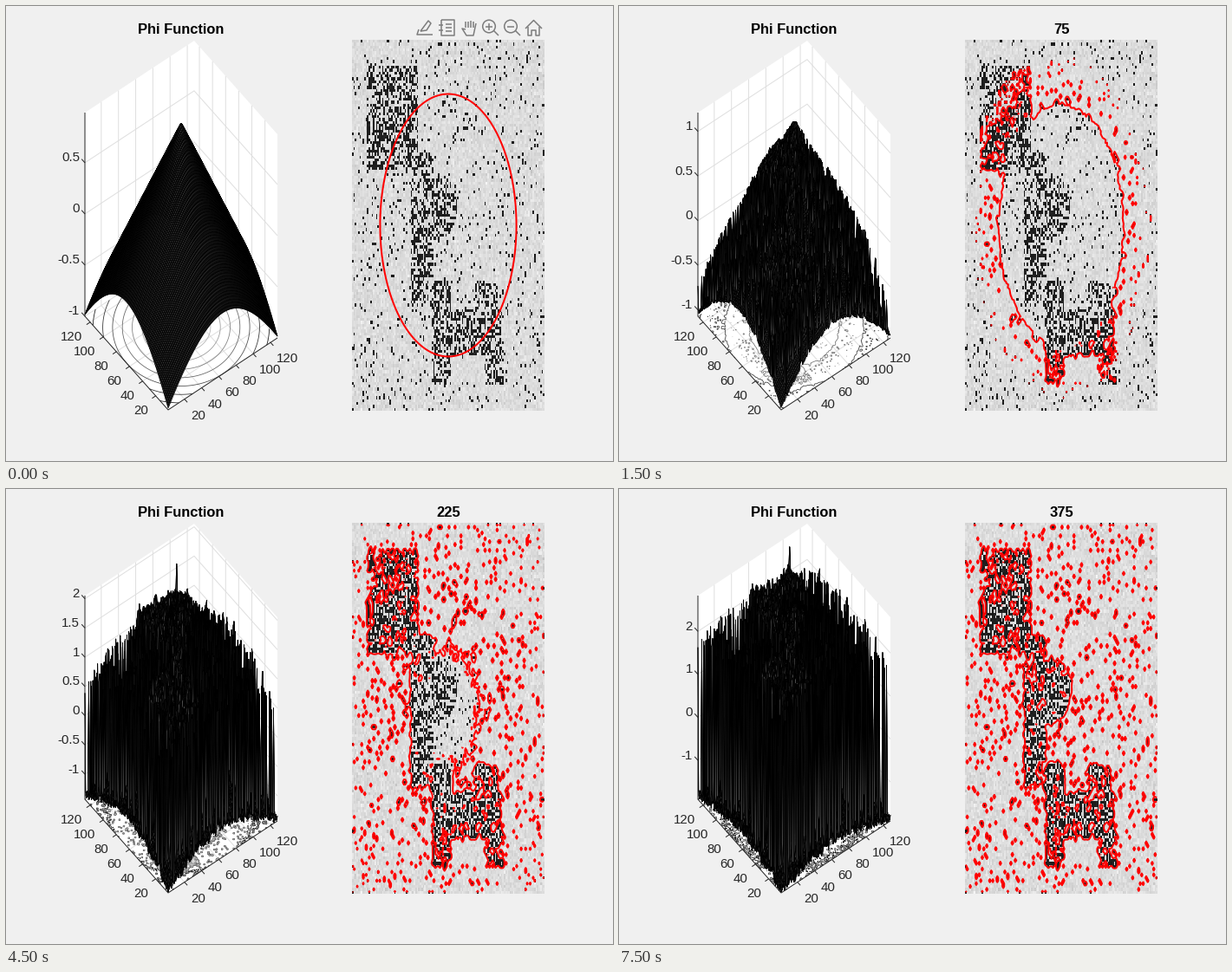
A matplotlib script for the animation above (8000 ms loop, 700x525 px).

```python
import numpy as np
import matplotlib.pyplot as plt
from matplotlib.animation import FuncAnimation
from matplotlib.collections import LineCollection, PolyCollection
from matplotlib.patches import Circle, Polygon

W, H, DPI = 700, 525, 100
PX = 72 / DPI
N = 128
FRAMES, STEP = 16, 25
LEFT, RIGHT, TOP, BOTTOM = 399, 621, 39, 467
INK, GRID, ICON = "#262626", "#dfdfdf", "#7c7c7c"

plt.rcParams["font.family"] = "Liberation Sans"
plt.rcParams["contour.negative_linestyle"] = "solid"
fig = plt.figure(figsize=(W / DPI, H / DPI), dpi=DPI, facecolor="#f0f0f0")
ax = fig.add_axes([0, 0, 1, 1])
ax.axis("off")

# Noisy picture: a dense dark figure among sparse dark specks
rng = np.random.default_rng(7)
px = LEFT + (np.arange(N) + 0.5) * (RIGHT - LEFT) / N
py = TOP + (np.arange(N) + 0.5) * (BOTTOM - TOP) / N
X, Y = np.meshgrid(px, py)
head, spine, left_leg, right_leg, hips, foot = (
    (417, 68, 476, 188), (467, 168, 493, 346), (491, 318, 514, 438),
    (541, 316, 567, 400), (491, 350, 570, 405), (551, 385, 575, 436))
inside = np.hypot((X - 494) / 27, (Y - 232) / 38) < 1
for x0, y0, x1, y1 in (head, spine, left_leg, right_leg, hips, foot):
    inside |= (X > x0) & (X < x1) & (Y > y0) & (Y < y1)
dark = rng.random((N, N)) < np.where(inside, 0.48, 0.055)
gray = np.where(dark, rng.normal(0.12, 0.015, (N, N)),
                rng.normal(0.86, 0.03, (N, N))).clip(0, 0.97)

# Level set: a cone pushed up on dark cells and down on bright ones
col, row = np.meshgrid(np.arange(N), np.arange(N))
phi0 = 1 - np.hypot(col - 63.5, row - 63.5) / 45.3
near = sum(np.roll(dark, (i, j), (0, 1)) for i in (-1, 0, 1)
           for j in (-1, 0, 1) if i or j) / 8
grain = rng.random((N, N))
lift = np.where(dark, 0.8 + 0.3 * near + 0.1 * grain, 1.8 * near ** 2)
drop = np.where(dark, 0, 0.85 + 0.3 * grain)


def warp(p):
    return p + p ** 3 / 12


def unwarp(y):
    return 4 * np.sinh(np.arcsinh(0.75 * y) / 3)


def evolve(k):
    """Surface at step k with its lower and upper height limit."""
    t = k / (FRAMES - 1)
    up, down = 3.73 * t ** 1.45, 1.4 * t ** 1.7
    phi = unwarp(warp(phi0) + up * lift - down * drop)
    return phi, unwarp(warp(-1) - down), max(0.99, unwarp(warp(0.93) + up))


def proj(u, v, h=0.0):
    return 187 + 126 * u - 96 * v, 466 - 83 * u - 108 * v - 235 * h


def lines(segs, color, width=1, z=1):
    return ax.add_collection(LineCollection(
        segs, colors=color, linewidths=width * PX, zorder=z), autolim=False)


def label(x, y, s, ha, size=15, color=INK, **kw):
    return ax.text(x, y, s, ha=ha, va="center", fontsize=size * PX,
                   color=color, **kw)


def title(x, s):
    return label(x, 28, s, "center", 16.5, "black", weight="bold")


def toolbar():
    segs = [[(476, 27), (474, 33), (492, 33)],                       # export
            [(478, 29), (487, 17), (490, 20), (485, 28), (478, 29)],
            [(502, 16), (517, 16), (517, 34), (502, 34), (502, 16)]]  # page
    segs += [[(507, y), (514, y)] for y in (21, 25, 29)]
    segs += [[(499, y), (504, y)] for y in (22, 28)]
    segs += [[(530 + 3 * i, 25), (530 + 3 * i, 18 - i % 3 / 2)]       # hand
             for i in range(4)]
    segs.append([(530, 27), (526, 26), (531, 34), (539, 34), (542, 20)])
    items = []
    for x in (557, 582):                                             # zoom
        segs += [[(x + 5.5, 28.5), (x + 11, 34)], [(x - 4, 23.5), (x + 4, 23.5)]]
        items.append(ax.add_patch(Circle((x, 23.5), 7.3, fill=False, ec=ICON,
                                         lw=1.5 * PX, zorder=6)))
    segs += [[(557, 19.5), (557, 27.5)],
             [(599, 26), (608.5, 16.5), (618, 26)],                  # home
             [(602, 24), (602, 34), (606, 34), (606, 28), (611, 28),
              (611, 34), (615, 34), (615, 24)]]
    return items + [lines(segs, ICON, 1.5, 6)]


ax.imshow(gray, cmap="gray", vmin=0, vmax=1, interpolation="nearest",
          extent=(LEFT, RIGHT, BOTTOM, TOP), aspect="auto", zorder=1)
ax.set_xlim(0, W)
ax.set_ylim(H, 0)

# White floor and walls share one outline
ax.add_patch(Polygon([proj(0, 0), proj(1, 0), proj(1, 0, 1), proj(1, 1, 1),
                      proj(0, 1, 1), proj(0, 1)], fc="white", zorder=0))
grid, marks = [], []
for tick in range(20, 121, 20):
    f = (tick - 1) / (N - 1)
    grid += [[proj(f, 0), proj(f, 1), proj(f, 1, 1)],
             [proj(0, f), proj(1, f), proj(1, f, 1)]]
    x, y = proj(f, 0)
    marks.append([(x, y), (x + 3.3, y + 3.7)])
    label(x + 7, y + 19, str(tick), "left")
    x, y = proj(0, f)
    marks.append([(x, y), (x - 4.2, y + 2.8)])
    label(x - 9, y + 17, str(tick), "right")
lines(grid, GRID)
lines(marks + [[proj(0, 1, 1), proj(0, 1), proj(0, 0), proj(1, 0)]], INK, z=5)
title(202, "Phi Function")
count = title(510, "")
icons = toolbar()

U, V = col / (N - 1), row / (N - 1)
FX, FY = proj(U, V)
live = []


def draw(k):
    while live:
        live.pop().remove()
    phi, lo, hi = evolve(k)
    span = hi - lo
    count.set_text(str(STEP * k) if k else "")
    for icon in icons:
        icon.set_visible(k < 2)

    # Height scale
    step = 0.5 if span < 3.85 else 1
    rails, pins = [], []
    for n in range(int(np.ceil(lo / step - 1e-6)), int(hi // step) + 1):
        h = (n * step - lo) / span
        rails.append([proj(0, 1, h), proj(1, 1, h), proj(1, 0, h)])
        x, y = proj(0, 1, h)
        pins.append([(x, y), (x - 3.8, y - 4.2)])
        live.append(label(85, y - 5.5, f"{n * step:g}", "right"))
    live.extend([lines(rails, GRID), lines(pins, INK, z=5)])

    # Contours on the floor
    gap = 0.2 if span < 2.2 else 0.5
    levels = gap * np.arange(np.ceil(lo / gap + 0.01), hi / gap)
    live.append(ax.contour(FX, FY, phi, levels=levels, cmap="gray", vmin=lo,
                           vmax=hi, linewidths=0.8 * PX, zorder=2))

    # Mesh, painted from the far corner to the near one
    p = np.dstack(proj(U, V, (phi.clip(lo, hi) - lo) / span))
    quads = np.stack([p[:-1, :-1], p[:-1, 1:], p[1:, 1:], p[1:, :-1]], axis=2)
    live.append(ax.add_collection(PolyCollection(
        quads.reshape(-1, 4, 2)[::-1], facecolors="#555555",
        edgecolors="black", linewidths=0.75 * PX, zorder=3), autolim=False))

    # Zero level over the picture
    live.append(ax.contour(px, py, phi, levels=[0], colors="red",
                           linewidths=2 * PX, zorder=4))
    return []


anim = FuncAnimation(fig, draw, frames=FRAMES, interval=500, repeat=True,
                     repeat_delay=0, init_func=lambda: [], blit=False)
plt.show()
```
